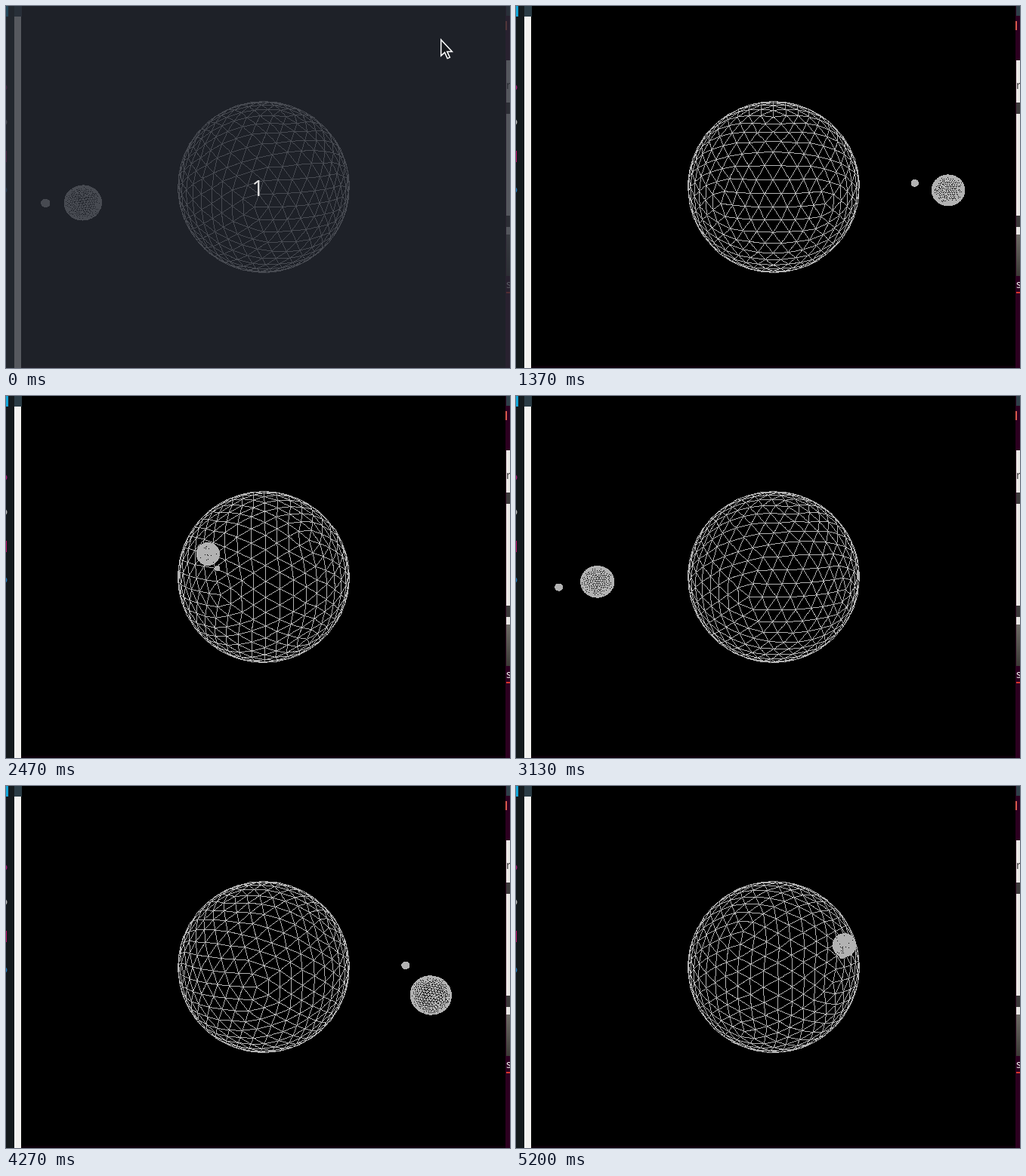
An HTML page with a canvas that plays this animation: 667 by 480 pixels, repeating every 5.23 s.

```html
<!DOCTYPE html>
<html lang="en">
<head>
<meta charset="utf-8">
<title>Wireframe orbits</title>
<style>
  html, body { margin: 0; width: 100%; height: 100%; overflow: hidden; background: #000; }
  #stage { position: absolute; left: 0; top: 0; width: 667px; height: 480px; overflow: hidden; background: #000; }
  #stage > * { position: absolute; }
  canvas, #dim { left: 0; top: 0; width: 667px; height: 480px; }
  #dim { background: rgba(39, 43, 52, .77); }
  #num { left: 0; top: 220px; width: 667px; text-align: center; color: #e2e2e2;
         font: 29px/41px "Open Sans", "Noto Sans", sans-serif; }
  .edge { left: 662px; font: 14px/16px "Noto Sans", sans-serif; }
  #cursor { left: 0; top: 0; overflow: visible; }
</style>
</head>
<body>
<div id="stage">
  <canvas id="view" width="667" height="480"></canvas>
  <span class="edge" style="top:97px;color:#333">r</span>
  <span class="edge" style="top:361px;color:#eee">s</span>
  <div id="dim"></div>
  <div id="num">1</div>
  <svg id="cursor" width="20" height="30">
    <path d="M.7 .7V22L5.6 17.6L9.2 25.6L12.4 24.2L8.8 16.4H15.4Z" fill="#16181c" stroke="#fff" stroke-width="1.5"/>
  </svg>
</div>
<script>
const W = 667, H = 480, LOOP = 5230, STEP = 100 / 3;
const CX = 341, CY = 240, FOCAL = 626;
const SIN = 0.199, COS = 0.98;
const SPIN = 0.112;
const $ = id => document.getElementById(id);
const ctx = $('view').getContext('2d');
const rad = deg => deg * Math.PI / 180;

// time, planet angle, moon angle (0 = left, 90 = nearest)
const orbit = [
  [0, 23.8, 32], [570, 84.5, 105], [1370, 175, 170], [2470, 296, 279.7],
  [3130, 367.4, 371], [4270, 500, 521], [5200, 597.3, 585], [5230, 600.6, 588]
];
const pointer = [[0, 575, 44], [100, 575, 44], [570, 589, 39], [1000, 601, -30], [LOOP, 601, -30]];

function sample(keys, t) {
  let i = 1;
  while (i < keys.length - 1 && keys[i][0] < t) i++;
  const a = keys[i - 1], b = keys[i], p = (t - a[0]) / (b[0] - a[0]);
  return a.slice(1).map((v, j) => v + (b[j + 1] - v) * p);
}

const sub = (p, q) => p.map((v, i) => v - q[i]);
const unit = p => { const n = Math.hypot(...p); return p.map(v => v / n); };
const mid = (p, q) => unit(p.map((v, i) => v + q[i]));

// Triple product: positive when a, b, c run counterclockwise seen from outside
const winding = ([a, b, c]) =>
  a[0] * (b[1] * c[2] - b[2] * c[1]) + a[1] * (b[2] * c[0] - b[0] * c[2]) + a[2] * (b[0] * c[1] - b[1] * c[0]);

function icosphere(levels) {
  const g = (1 + Math.sqrt(5)) / 2, pts = [];
  for (const a of [-1, 1]) for (const b of [-g, g])
    pts.push([a, 0, b], [0, b, a], [b, a, 0]);
  const near = (p, q) => Math.hypot(...sub(p, q)) < 2.1;
  let faces = [];
  for (let i = 0; i < 12; i++) for (let j = 0; j < i; j++) for (let k = 0; k < j; k++) {
    const f = [pts[i], pts[j], pts[k]];
    if (!near(f[0], f[1]) || !near(f[1], f[2]) || !near(f[0], f[2])) continue;
    faces.push((winding(f) > 0 ? f : f.reverse()).map(unit));
  }
  while (levels--) faces = faces.flatMap(([a, b, c]) => {
    const ab = mid(a, b), bc = mid(b, c), ca = mid(c, a);
    return [[a, ab, ca], [ab, b, bc], [ca, bc, c], [ab, bc, ca]];
  });
  return faces;
}
const mesh = icosphere(3);

const image = ctx.createImageData(W, H);
const pixels = new Uint32Array(image.data.buffer);
const INK = 0xffb2b2b2;

function line(x0, y0, x1, y1) {
  const n = Math.max(1, Math.ceil(Math.max(Math.abs(x1 - x0), Math.abs(y1 - y0))));
  for (let i = 0; i <= n; i++) {
    const x = Math.floor(x0 + (x1 - x0) * i / n), y = Math.floor(y0 + (y1 - y0) * i / n);
    if (x >= 21 && x < 661 && y >= 0 && y < 477) pixels[y * W + x] = INK;
  }
}

function project(x, y, z) {
  const s = FOCAL / (1 - z * COS - y * SIN);
  return [CX + x * s, CY + (z * SIN - y * COS) * s];
}

function sphere([x, y, z], r, turn) {
  const c = Math.cos(turn) * r, s = Math.sin(turn) * r;
  for (const face of mesh) {
    const [a, b, d] = face.map(p => project(x + p[0] * c + p[2] * s, y + p[1] * r, z + p[2] * c - p[0] * s));
    const facing = (b[0] - a[0]) * (d[1] - a[1]) - (b[1] - a[1]) * (d[0] - a[0]);
    if (facing >= 0) continue;
    line(...a, ...b);
    line(...b, ...d);
    line(...d, ...a);
  }
}

function rect(color, x, y, w, h) {
  ctx.fillStyle = color;
  ctx.fillRect(x, y, w, h);
}

function dot(color, y) {
  ctx.fillStyle = color;
  ctx.beginPath();
  ctx.arc(-3, y, 4.5, 0, 7);
  ctx.fill();
}

// Slivers of the windows behind
function surroundings() {
  rect('#13191c', 0, 0, 11, H);
  rect('#12a5d8', 0, 0, 3, 14);
  rect('#2c3d46', 11, 0, 10, 14);
  rect('#f3f2f0', 11, 14, 9, H - 14);
  dot('#b0197a', 108);
  dot('#b8b8b8', 154);
  rect('#c2136b', 0, 192, 1, 15);
  dot('#2277b8', 244);
  rect('#2c0020', 661, 0, 6, H);
  rect('#2f4049', 662, 0, 5, 13);
  rect('#d9574b', 661, 20, 2, 12);
  rect('#ebe9e6', 662, 72, 5, 231);
  rect('#3b3a39', 662, 128, 5, 15);
  rect('#3b3a39', 662, 278, 5, 15);
  const shade = ctx.createLinearGradient(0, 303, 0, 358);
  shade.addColorStop(0, '#6c6a64');
  shade.addColorStop(1, '#3c3b36');
  ctx.fillStyle = shade;
  ctx.fillRect(662, 303, 5, 55);
  rect('#d8352a', 662, 379, 5, 2);
  rect('#0c0009', 20, 477, 641, 3);
}

function draw(t) {
  const [planet, moon] = sample(orbit, t).map(rad);
  const turn = rad((t - 1370) * SPIN);
  const mx = -0.077 - 0.376 * Math.cos(moon), mz = -0.05 + 0.367 * Math.sin(moon);
  pixels.fill(0xff000000);
  sphere([0, 0, 0], 0.1784, turn);
  sphere([-0.358 * Math.cos(planet), 0, 0.358 * Math.sin(planet)], 0.0316, turn);
  sphere([mx, 0.12 * mz + 0.04 * mx - 0.002, mz], 0.007, turn);
  ctx.putImageData(image, 0, 0);
  surroundings();

  const fade = Math.max(0, Math.min(1, 1 - (t - 67) / 300));
  $('dim').style.opacity = $('num').style.opacity = fade;
  const [px, py] = sample(pointer, t);
  $('cursor').style.transform = `translate(${Math.round(px)}px, ${Math.round(py)}px)`;
}

let last = -1;
function tick() {
  const now = performance.now() % LOOP;
  const t = now < 95 ? 0 : 100 + Math.floor((now - 95) / STEP) * STEP;
  if (t !== last) draw(last = t);
  requestAnimationFrame(tick);
}
tick();
</script>
</body>
</html>
```
